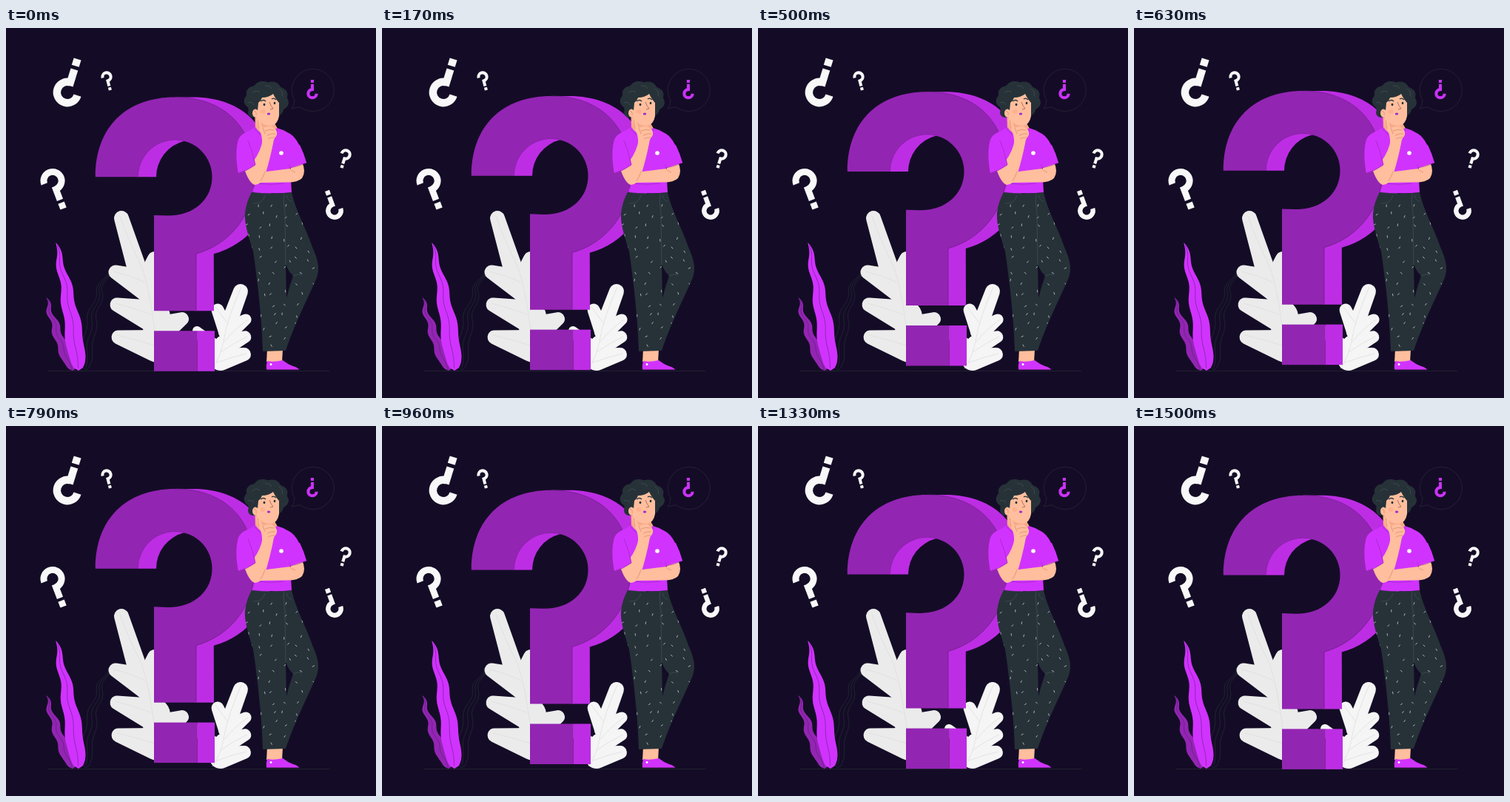
Write an HTML page with a canvas that moves like this. It is 500x500 px and loops after 1.54 s.

```html
<!DOCTYPE html>
<html lang="en">
<head>
<meta charset="utf-8">
<title>Thinking</title>
<style>
html, body { margin: 0; width: 100%; height: 100%; overflow: hidden; background: #140c26; }
canvas { display: block; width: 100vw; height: 100vh; }
</style>
</head>
<body>
<canvas id="stage" width="500" height="500"></canvas>
<script>
const ctx = document.getElementById('stage').getContext('2d');
const LOOP = 1540, STEP = 1000 / 24, TAU = Math.PI * 2;
const BG = '#140c26', FRONT = '#9325b3', SIDE = '#bd2de4', BRIGHT = '#d133ff';
const SKIN = '#ffbe9d', DARK = '#263238', FAINT = '#292638', FOLD = '#9a27bd', CREASE = '#d9866c';

const draw = (path, fill, stroke, width = 0.7) => {
  if (fill) { ctx.fillStyle = fill; ctx.fill(path); }
  if (stroke) { ctx.strokeStyle = stroke; ctx.lineWidth = width; ctx.stroke(path); }
};
const shape = (d, fill) => draw(new Path2D(d), fill);
const line = (d, stroke, width) => draw(new Path2D(d), null, stroke, width);
const dot = (x, y, rx, fill, ry = rx) => {
  const p = new Path2D();
  p.ellipse(x, y, rx, ry, 0, 0, TAU);
  draw(p, fill);
};
const mix = (a, b, u) => a + (b - a) * u;

// Leaf with a curved spine, swaying sideways as it widens towards its base.
function wavyLeaf(tip, bend, base, width, sway, fill, vein) {
  const spine = u => [0, 1].map(k => mix(mix(tip[k], bend[k], u), mix(bend[k], base[k], u), u));
  const edge = (u, side) => {
    const [x, y] = spine(u);
    const half = width * u ** 0.65 * Math.sqrt(1 - u ** 9);
    return [x + side * half + sway * Math.sin(TAU * 3.5 * u + 0.15) * Math.sqrt(1 - u), y];
  };
  const p = new Path2D();
  for (let u = 0; u <= 1; u += 0.02) p.lineTo(...edge(u, 1));
  for (let u = 1; u >= 0; u -= 0.02) p.lineTo(...edge(u, -1));
  p.closePath();
  draw(p, fill, fill ? null : vein);
  const rib = new Path2D();
  for (let u = 0.02; u <= 1; u += 0.02) rib.lineTo(...edge(u, 0));
  draw(rib, null, vein);
}

// Tapered lobe: the hull of a large circle at the stem and a small one at the tip.
function lobe(x0, y0, r0, x1, y1, r1, fill) {
  const dir = Math.atan2(y1 - y0, x1 - x0);
  const open = Math.acos((r0 - r1) / Math.hypot(x1 - x0, y1 - y0));
  const p = new Path2D();
  p.arc(x0, y0, r0, dir + open, dir - open);
  p.arc(x1, y1, r1, dir - open, dir + open);
  p.closePath();
  draw(p, fill);
}

function whitePlants() {
  const left = '#ebebeb', right = '#f5f5f5', vein = '#dcdcdc';
  lobe(176, 322, 13, 156, 257, 10, left);
  lobe(195, 350, 22, 201, 312, 10, left);
  lobe(205, 410, 20, 238, 393, 9, left);
  for (let i = 0; i < 3; i++) {
    lobe(195 + 5 * i, 350 + 40 * i, 22, 148 + 2 * i, 330 + 44 * i, 9.5, left);
  }
  line('M154 254Q166 289 180 315T206 449', vein);
  for (let i = 0; i < 3; i++) {
    line(`M${146 + 2 * i} ${329 + 43 * i}Q172 ${336 + 42 * i} ${188 + 8 * i} ${344 + 43 * i}`, vein);
  }

  lobe(300, 402, 11, 317, 356, 10, right);
  lobe(298, 410, 11, 286, 381, 8.5, right);
  lobe(286, 440, 15, 258, 409, 6, right);
  for (let i = 0; i < 3; i++) {
    lobe(300 - 5 * i, 410 + 19 * i, 13 + i, 324 - i, 394 + 23.5 * i, 7.5 + 0.7 * i, right);
  }
  line('M318 350Q300 390 295 418T279 460M283 377L300 400', vein);
  for (let i = 0; i < 3; i++) {
    line(`M${327 - i} ${394 + 23 * i}Q307 ${408 + 18 * i} ${295 - 5 * i} ${424 + 14 * i}`, vein);
  }
}

function floorAndPlants() {
  line('M57 463.5H437', FAINT, 0.8);
  wavyLeaf([140, 325], [112, 380], [108, 462], 9, 3, null, '#282b38');
  wavyLeaf([54, 364], [69, 415], [90, 463], 10, 2.5, FRONT, '#681a86');
  wavyLeaf([67, 290], [88, 370], [98, 463], 15, 2.2, BRIGHT, '#77209a');
  whitePlants();
}

function bigMark(offset) {
  const cx = 228.5, cy = 201, out = 107.7, inn = 50, depth = 24.5, k = 0.62;
  // A slightly squared quarter of the outer bowl.
  const shoulder = (p, x, dir) => p.bezierCurveTo(
    x + dir * out * k, cy - out, x + dir * out, cy - out * k, x + dir * out, cy);
  ctx.save();
  ctx.translate(0, offset);

  const side = new Path2D();
  side.moveTo(cx, cy - out);
  side.lineTo(cx + depth, cy - out);
  shoulder(side, cx + depth, 1);
  side.arc(cx + depth, cy, out, 0, 1.31);
  side.lineTo(281, 382);
  side.lineTo(256, 382);
  side.lineTo(256, 300);
  side.lineTo(cx + out - 5, cy);
  side.closePath();
  draw(side, SIDE);

  const inside = new Path2D();
  inside.moveTo(cx - inn - 0.5, cy);
  inside.arc(cx, cy, inn + 0.5, Math.PI, -1.315);
  inside.arc(cx + depth, cy, inn, -1.815, -Math.PI, true);
  inside.closePath();
  draw(inside, SIDE);

  const face = new Path2D();
  face.moveTo(cx, cy - out);
  shoulder(face, cx, 1);
  face.arc(cx, cy, out, 0, 1.303);
  face.lineTo(257, 382);
  face.lineTo(200, 382);
  face.lineTo(200, 252.7);
  face.lineTo(218, 253.3);
  face.bezierCurveTo(254, 254, cx + inn, 231, cx + inn, cy);
  face.arc(cx, cy, inn, 0, Math.PI, true);
  face.lineTo(cx - out, cy);
  face.bezierCurveTo(cx - out, cy - out * k, cx - out * k, cy - out, cx, cy - out);
  draw(face, FRONT);

  const seam = new Path2D();
  seam.moveTo(cx, cy - out);
  shoulder(seam, cx, 1);
  seam.arc(cx, cy, out, 0, 1.303);
  seam.lineTo(257, 382);
  draw(seam, null, '#65207d');

  ctx.fillStyle = FRONT;
  ctx.fillRect(200, 409, 58.5, 54.5);
  ctx.fillStyle = SIDE;
  ctx.fillRect(258.5, 409, 23.5, 54.5);
  line('M258.5 409V463.5M178.5 201A50 50 0 0 1 241 152.5', '#7d2099', 0.5);
  ctx.restore();
}

// Origin is the centre of the ring; the dot lies along +y before rotation.
function glyph(x, y, scale, degrees, color = '#f8f8f8') {
  ctx.save();
  ctx.translate(x, y);
  ctx.rotate(degrees * Math.PI / 180);
  ctx.scale(scale, scale);
  const hook = new Path2D();
  hook.arc(0, 0, 79, Math.PI, Math.PI / 2);
  draw(hook, null, color, 58);
  ctx.fillStyle = color;
  ctx.fillRect(-28, 52, 57, 129);
  ctx.fillRect(-28, 208, 58, 55);
  ctx.restore();
}

function smallMarks() {
  glyph(83, 87, 0.179, 197);
  glyph(136, 66, 0.071, -15);
  glyph(63, 206.5, 0.153, -21);
  glyph(459, 171, 0.072, 17);
  glyph(444, 247, 0.11, 160);
  line('M390 98A28.5 28.5 0 1 1 398 107Q393 107 386 109Q390 105 390 98Z', FAINT, 0.8);
  glyph(414, 88.7, 0.071, 180, '#ca32f5');
}

function specks(area) {
  let seed = 7;
  const rnd = () => (seed = seed * 16807 % 2147483647) / 2147483647;
  const p = new Path2D();
  for (let y = 232; y < 436; y += 15) {
    for (let x = 322; x < 424; x += 17) {
      const sx = x + rnd() * 11, sy = y + rnd() * 9, a = 0.5 + rnd() * 2.2;
      p.moveTo(sx, sy);
      p.lineTo(sx + Math.cos(a) * 3.4, sy + Math.sin(a) * 3.4);
    }
  }
  ctx.save();
  ctx.clip(area);
  draw(p, null, '#cfd4d6', 0.8);
  ctx.restore();
}

function legs() {
  shape('M353 434H374L373 452Q362 456 352 451Z', SKIN);
  shape('M353 450Q362 452 374 449Q380 454 388 457Q395 459 396 462H352Q351 456 353 450Z', BRIGHT);
  line('M352 461.5H396', '#8e25aa', 1);
  dot(358, 454.5, 1.5, '#fff');
  const pants = new Path2D(`M332 222Q360 225 386 222C391 246 405 270 414 296C422 314 424 325 420 337
    C411 359 391 397 378 436L347 437C346 396 340 342 334 302C327 279 322 264 323 250Q325 234 332 222Z`);
  draw(pants, DARK);
  specks(pants);
  shape('M378 319Q381 328 388 335Q383 349 379 365Z', BG);
  line('M376 224Q374 234 377 248L378 320M388 335Q394 332 401 333M334 237Q347 238 350 226M386 234Q381 234 379 226',
    '#42515a');
}

function torso() {
  shape('M336 110L337 137Q347 151 367 136L361 125Z', '#f6a98a');
  shape(`M337 134C328 140 317 142 314 151C310 164 311 181 314 196L336 186L340 203L333 221
    Q360 225 386 222L384 188L406 182C399 163 393 147 382 142Q374 137 366 135Q350 153 337 134Z`, BRIGHT);
  line('M336 136Q348 154 368 137M383 166Q385 176 383 187M338 210Q358 213 376 210', FOLD);
  dot(372, 169, 2.8, '#fff');
  shape('M384 184L400 181Q406 194 400 203Q394 209 378 208.5L342 209L345 195Q367 192 385 190Z', SKIN);
  shape('M379 160L397 158Q403 170 406 182L384 189Z', BRIGHT);
  line('M384 189Q395 187 406 182', FOLD);
  shape('M322 190L335 179Q344 167 347 151L362 151Q357 177 350 199Q345 212 336 212Q328 209 322 190Z', SKIN);
  line('M350 194Q347 203 344 207M383 190Q387 194 391 195', CREASE);
  shape('M314 151Q310 172 314 196Q326 193 337 185Q334 163 329 151Z', BRIGHT);
  line('M314 196Q326 193 337 185M327 152Q333 166 337 185', FOLD);
}

function curls() {
  const p = new Path2D();
  for (let a = 0; a < TAU; a += 0.04) {
    const r = 0.94 + 0.09 * Math.abs(Math.sin(a * 4.5 + 0.5));
    p.lineTo(352 + 29.5 * r * Math.cos(a), 97 + 25 * r * Math.sin(a));
  }
  p.closePath();
  draw(p, DARK);
  dot(334, 114, 7, DARK);
  line('M333 88Q337 83 343 87M350 78Q356 77 359 82M369 82Q375 86 373 92M327 101Q333 99 335 104', '#45535a');
}

function head() {
  curls();
  shape('M341 101Q345 98 346 94Q355 94 361 89Q365 97 369 101L369 119Q367 130 359 132Q347 133 339 122Z', SKIN);
  dot(337, 115, 4, SKIN, 5.5);
  line('M335 112Q339 113 338 118', CREASE);
  dot(347, 113, 3.5, '#ffb08f', 2.8);
  line('M344 99Q348 96 351 99M359 96Q362 94 365 97', DARK, 1.3);
  dot(349, 103.5, 1.4, DARK, 1.8);
  dot(363, 101.5, 1.3, DARK, 1.7);
  line('M356 100Q358 106 361 109L357 110', '#a45d4b', 0.8);
  dot(355, 116, 2.2, '#982ad0', 1.6);
}

function hand() {
  shape(`M338 125Q338 121 342 122L347 135Q353 132 359 133L365 138Q368 144 363 149
    Q360 156 354 159L346 157Q347 145 341 135Z`, SKIN);
  line('M347 135L350 143M350 139Q357 136 362 138M353 145Q359 142 364 143M354 150Q359 147 363 148M340 124L342 136', CREASE);
}

function render(now) {
  const tick = Math.floor((now % LOOP + 5.5) / STEP);
  const phase = (tick * STEP + 58) / LOOP * TAU;
  ctx.fillStyle = BG;
  ctx.fillRect(0, 0, 500, 500);
  floorAndPlants();
  bigMark(0.4 - 4.5 * (1 - Math.cos(phase)));
  smallMarks();
  legs();
  torso();
  head();
  hand();
}

const start = performance.now();
function loop() {
  render(performance.now() - start);
  requestAnimationFrame(loop);
}
loop();
</script>
</body>
</html>
```
